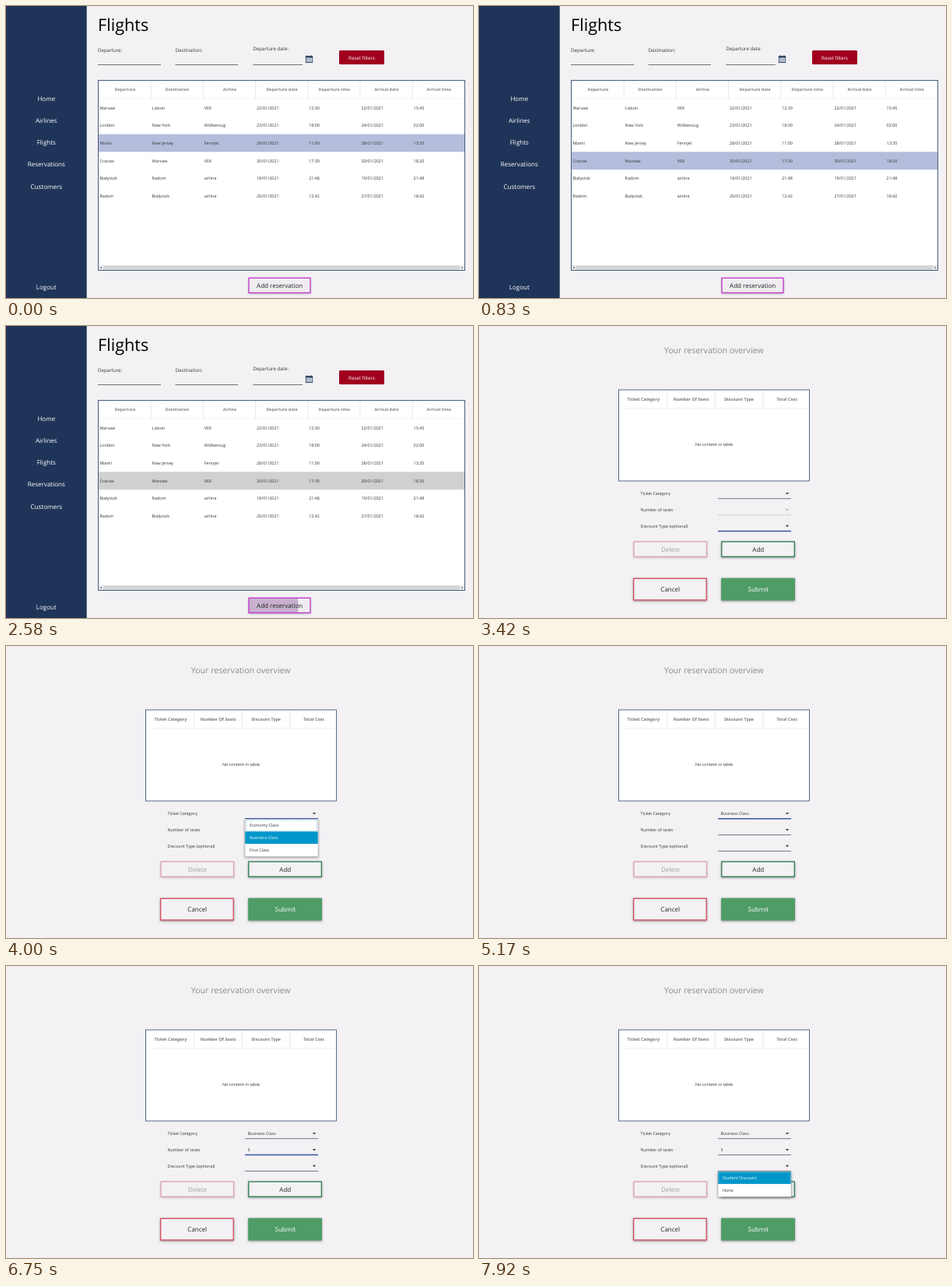
An HTML page that plays this animation: 600x375 px, repeating every 8000 ms.

```html
<!DOCTYPE html>
<html lang="en">
<head>
<meta charset="utf-8">
<title>Flight reservation</title>
<style>
  html, body { margin: 0; width: 100%; height: 100%; overflow: hidden; background: #f3f1f4; }
  svg { display: block; width: 600px; height: 375px; }
  text { font-family: "Open Sans", "Noto Sans", sans-serif; text-rendering: geometricPrecision; white-space: pre; }
  .raised { filter: drop-shadow(0 1px 1.5px rgba(0, 0, 0, .4)); }
</style>
</head>
<body>
<svg id="stage" viewBox="0 0 600 375"></svg>
<script>
const LOOP = 8000;
const stage = document.getElementById('stage');

const rect = (x, y, w, h, fill, extra = '') =>
  `<rect x="${x}" y="${y}" width="${w}" height="${h}" fill="${fill}" ${extra}/>`;
const line = (x1, y1, x2, y2, color, width = 1, extra = '') =>
  `<path d="M${x1} ${y1}L${x2} ${y2}" stroke="${color}" stroke-width="${width}" ${extra}/>`;
const text = (s, x, y, size, fill = '#333', extra = '') =>
  `<text x="${x}" y="${y}" font-size="${size}" fill="${fill}" ${extra}>${s}</text>`;
const mid = (s, x, y, size, fill, extra = '') =>
  text(s, x, y, size, fill, `text-anchor="middle" ${extra}`);
const heading = (s, x, y, size, fill) => mid(s, x, y, size, fill, 'font-weight="700"');

// Value of the last [time, value] step already reached
const stepAt = (steps, t) => steps.reduce((v, [at, next]) => t >= at ? next : v, -1);

/* ---------- flight list ---------- */

const COLUMNS = ['Departure', 'Destination', 'Airline', 'Departure date', 'Departure time', 'Arrival date', 'Arrival time'];
const COL_W = 67.2;
const FLIGHTS = [
  'Warsaw|Lisbon|VEK|22/01/2021|12:30|22/01/2021|15:45',
  'London|New York|Wolkenzug|23/01/2021|18:00|24/01/2021|02:00',
  'Miami|New Jersey|Fennjet|28/01/2021|11:00|28/01/2021|13:35',
  'Cracow|Warsaw|VEK|30/01/2021|17:30|30/01/2021|18:20',
  'Białystok|Radom|airline|18/01/2021|21:48|19/01/2021|21:48',
  'Radom|Białystok|airline|26/01/2021|12:42|27/01/2021|18:42'
].map(row => row.split('|'));
const SELECT = 400, PRESS = 2420, OPEN_FORM = 2750;

function sidebar() {
  const items = [['Home', 121.6], ['Airlines', 149.8], ['Flights', 178], ['Reservations', 206.2], ['Customers', 234.5], ['Logout', 363.5]];
  return rect(0, 0, 103.7, 375, '#1e3458') + items.map(([s, y]) => mid(s, 51.8, y, 8.05, '#fff')).join('');
}

function calendar() {
  let s = rect(385.3, 64.6, 8.4, 8, '#fff', 'stroke="#2d4468" stroke-width=".9"') + rect(385, 64.2, 9, 2.4, '#2d4468')
    + rect(386.6, 63.2, 1, 1.5, '#2d4468') + rect(391.4, 63.2, 1, 1.5, '#2d4468');
  for (let i = 0; i < 9; i++) s += rect(386.5 + i % 3 * 2.2, 67.5 + (i / 3 | 0) * 1.7, 1.4, 1, '#2d4468');
  return s;
}

function filters() {
  return text('Flights', 118, 32.2, 21.7, '#000')
    + text('Departure:', 118, 58.6, 6.2) + text('Destination:', 217.5, 58.6, 6.2) + text('Departure date:', 317.3, 57, 6.2)
    + line(118, 75.5, 199, 75.5, '#666', .9) + line(217.5, 75.5, 298, 75.5, '#666', .9) + line(317.3, 75.5, 381, 75.5, '#666', .9)
    + calendar()
    + rect(428, 57, 58, 18, '#a0001e', 'rx="1.5"') + mid('Reset filters', 457, 68.5, 6.2, '#fff');
}

function flightTable(t) {
  const selected = t < SELECT ? 2 : 3;
  let s = rect(118.5, 95.5, 471, 244, '#fff') + line(119, 119, 589, 119, '#eeedf0', .7);
  COLUMNS.forEach((name, i) => {
    s += heading(name, 153 + i * COL_W, 109, 5.25, '#858585');
    if (i) s += line(119 + i * COL_W, 96, 119 + i * COL_W, 119, '#e2e1e6', .8);
  });
  FLIGHTS.forEach((row, r) => {
    const y = 119.2 + r * 22.7;
    if (r === selected) s += rect(119, y, 470, 22.7, t < PRESS ? '#b5bddc' : '#d0d0d1');
    row.forEach((cell, c) => s += text(cell, 120.4 + c * COL_W, y + 13.4, 5.4));
  });
  return s + rect(119, 332.8, 470, 6.2, '#e8e8e9') + rect(125, 333.4, 458, 5, '#d3d3d5', 'rx="1"')
    + '<path d="M122.7 334.4v3.2l-2-1.6zM585.6 334.4v3.2l2-1.6z" fill="#777"/>'
    + rect(118.5, 95.5, 471, 244, 'none', 'stroke="#465c7c"');
}

function addReservation(t) {
  const radius = Math.max(0, Math.min(90, (t - PRESS) * .235));
  return rect(312, 349.3, 79, 19, '#f0edf1', 'class="raised"')
    + '<clipPath id="press"><rect x="312" y="349" width="79" height="19.5"/></clipPath>'
    + `<circle cx="338" cy="359" r="${radius.toFixed(1)}" fill="#b493ba" opacity=".65" clip-path="url(#press)"/>`
    + rect(312, 349.3, 79, 19, 'none', 'stroke="#c338cf" stroke-width="1.3"')
    + mid('Add reservation', 351.7, 361.7, 8, '#222');
}

const flightsPage = t => rect(0, 0, 600, 375, '#f3f1f4') + sidebar() + filters() + flightTable(t) + addReservation(t);

/* ---------- reservation form ---------- */

const FIELDS = [
  { label: 'Ticket Category', y: 221.7, focus: [3500, 5420], open: [3500, 4420], value: 'Business Class', enabled: 0,
    items: ['Economy Class', 'Business Class', 'First Class'], hover: [[3670, 0], [4000, 1]] },
  { label: 'Number of seats', y: 242.6, focus: [5420, 7330], open: [5420, 6500], value: '5', enabled: 4420,
    items: [1, 2, 3, 4, 5, 6, 7, 8, 9, 10], hover: [[5580, 0], [5750, 1], [5850, 2], [6000, 3], [6250, 4]] },
  { label: 'Discount Type (optional)', y: 263.4, focus: [3170, 3500], open: [7330, LOOP], value: '', enabled: 0,
    items: ['Student Discount', 'None'], hover: [[7500, 0]] }
];
const within = ([from, to], t) => t >= from && t < to;

function field(f, t) {
  const enabled = t >= f.enabled;
  let s = text(f.label, 207.5, f.y - 4.6, 5.4)
    + line(307, f.y, 401, f.y, enabled ? '#666a72' : '#aaa', .9, enabled ? '' : 'stroke-dasharray="1 1"')
    + `<path d="M393.8 ${f.y - 7.6}h4.4l-2.2 2.4z" fill="${enabled ? '#444' : '#b5b5b5'}"/>`;
  if (within(f.focus, t)) {
    const half = 47 * Math.min(1, (t - f.focus[0]) / 180);
    s += line(354 - half, f.y, 354 + half, f.y, '#4059a9', 1.5);
  }
  if (t >= f.open[1]) s += text(f.value, 310.5, f.y - 4.6, 5.35);
  return s;
}

function popup(f, t) {
  if (!within(f.open, t)) return '';
  const step = 15.7, top = f.y + .6, scrolls = f.items.length > 5, width = scrolls ? 87 : 93.5;
  const hover = stepAt(f.hover, t), height = f.items.length * step + 1;
  let s = rect(307, top, 94, height, '#fff', 'stroke="#b9b9bb" stroke-width=".6" class="raised"');
  f.items.forEach((item, i) => {
    const y = top + i * step;
    if (i === hover) s += rect(307.2, y + .3, width, step, '#0096c9');
    if (!i) s += rect(308.8, y + 1.2, width - 3, step - 1.6, 'none', 'stroke="#65b5d3" stroke-width=".7" stroke-dasharray="1.5 1"');
    s += text(item, 313, y + 9.9, 5.4, i === hover ? '#fff' : '#333');
  });
  if (scrolls) s += rect(394.5, top, 6.3, height, '#e6e6e7') + rect(395.2, top + 5, 5, 72, '#cfcfd1', 'rx="1" stroke="#b4b4b6" stroke-width=".5"')
    + `<path d="M396 ${top + 3.4}h3.4l-1.7-2z" fill="#777"/>`;
  return s;
}

function summaryTable() {
  let s = rect(179.5, 82, 245, 117, '#fff') + line(180, 105.5, 424, 105.5, '#f0eff2', .7);
  ['Ticket Category', 'Number Of Seats', 'Discount Type', 'Total Cost'].forEach((name, i) => {
    s += heading(name, 211.3 + i * 61.4, 95.8, 5.4, '#777');
    if (i) s += line(180.6 + i * 61.4, 82.5, 180.6 + i * 61.4, 105, '#e2e1e6', .8);
  });
  return s + mid('No content in table', 302, 154, 5.4, '#333') + rect(179.5, 82, 245, 117, 'none', 'stroke="#53698c"');
}

const button = (label, x, y, h, fill, border, color) =>
  `<g class="raised">${rect(x, y, 93.5, h, fill, `stroke="${border}" stroke-width="1.3"`)}</g>`
  + mid(label, x + 47, y + h / 2 + 2.9, 8, color);

function formPage(t) {
  return rect(0, 0, 600, 375, '#f3f1f4')
    + mid('Your reservation overview', 301.7, 34.8, 10.6, '#8c8b8d')
    + summaryTable()
    + FIELDS.map(f => field(f, t)).join('')
    + `<g opacity=".5">${button('Delete', 199, 277, 19.2, '#f3f1f4', '#d0566a', '#555')}</g>`
    + button('Add', 311.8, 277, 19.2, '#f3f1f4', '#2f7d50', '#222')
    + button('Cancel', 198.7, 324.3, 27.6, '#f3f1f4', '#d54a5c', '#222')
    + button('Submit', 311.8, 324.3, 27.6, '#4f9c66', '#4f9c66', '#fff')
    + FIELDS.map(f => popup(f, t)).join('');
}

let shown = '';
function draw(now) {
  const t = now % LOOP;
  const page = t < OPEN_FORM ? flightsPage(t) : formPage(t);
  if (page !== shown) stage.innerHTML = shown = page;
  requestAnimationFrame(draw);
}
draw(performance.now());
</script>
</body>
</html>
```
